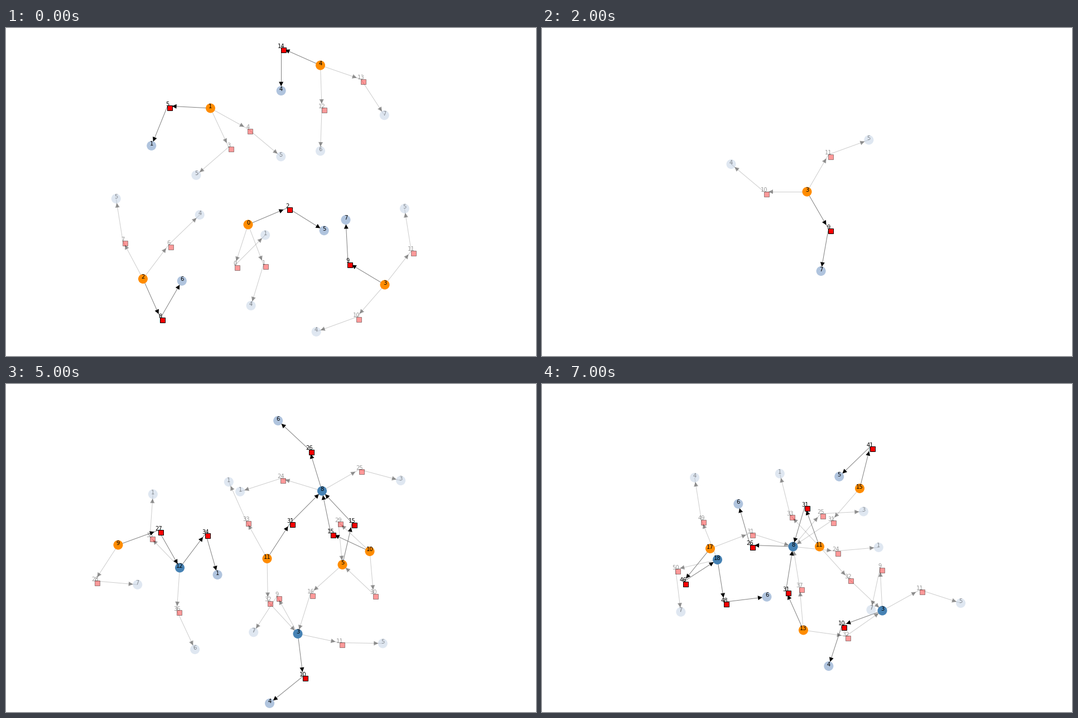
Write a matplotlib script that moves like this. It is 950 px wide and 589 px high and loops after 8 s.

```python
import math

import matplotlib.pyplot as plt
from matplotlib.animation import ArtistAnimation
from matplotlib.patches import Circle, Polygon, Rectangle

W, H, DPI = 950, 589, 100
PX = 72 / DPI  # one pixel in points
LINK, RADIUS, SIDE, HEAD = 77, 8.5, 9, 8
FADED = 0.4
ROOT, INNER, LEAF = "darkorange", "steelblue", "lightsteelblue"

# Where the numbered actions lead: to a loose leaf or on to another state.
LEAVES = {1: (0, 5, 24, 33, 34, 35, 40), 2: (18,), 3: (23, 25, 43),
          4: (1, 6, 10, 14, 45, 49), 5: (2, 3, 4, 7, 11, 19, 41),
          6: (8, 12, 26, 36, 44, 48), 7: (9, 13, 28, 50)}
JOINS = {3: (16, 21, 32), 5: (29, 30), 8: (15, 31, 37),
         12: (27,), 16: (38,), 18: (46,)}

plt.rcParams["font.family"] = "DejaVu Sans"
fig = plt.figure(figsize=(W / DPI, H / DPI), dpi=DPI, facecolor="white")
ax = fig.add_axes([0, 0, 1, 1])
ax.set_xlim(0, W)
ax.set_ylim(H, 0)
ax.axis("off")


def goal(action, groups):
    return next(key for key, members in groups.items() if action in members)


def step(pos, heading):
    """Walk one link from pos; headings are clockwise degrees from the right."""
    angle = math.radians(heading)
    return pos[0] + LINK * math.cos(angle), pos[1] + LINK * math.sin(angle)


def spread(start, turn, *actions):
    """Fan the actions out evenly, each bending on the way to its leaf."""
    bend = 40
    return {a: (start + i * turn, start + i * turn + bend)
            for i, a in enumerate(actions)}


class Net:
    """One picture of the graph: round states joined through square actions."""

    def __init__(self):
        self.places = {}
        self.states = []

    def state(self, key, x, y, actions, color=ROOT):
        """Add a state; its first action is the chosen one, the rest are faded.

        Actions map to (heading, leaf heading), or to one heading for a join.
        """
        self.places[key] = (x, y)
        self.states.append((key, color, actions))

    def artists(self):
        out = []
        for key, color, actions in self.states:
            pos = self.places[key]
            for i, (action, way) in enumerate(actions.items()):
                alpha = FADED if i else 1
                if isinstance(way, tuple):
                    mid = step(pos, way[0])
                    end = step(mid, way[1])
                    out += disc(goal(action, LEAVES), end, LEAF, alpha)
                else:
                    mid = step(pos, way)
                    end = self.places[goal(action, JOINS)]
                out += link(pos, mid, alpha) + link(mid, end, alpha)
                out += square(action, mid, alpha)
            out += disc(key, pos, color)
        return out


def link(a, b, alpha):
    """Thin line from a to b with an arrowhead stopping short of b."""
    dist = math.dist(a, b)
    ux, uy = (b[0] - a[0]) / dist, (b[1] - a[1]) / dist

    def at(back, side):
        return b[0] - ux * back - uy * side, b[1] - uy * back + ux * side

    line, = ax.plot([a[0], b[0]], [a[1], b[1]], color="#808080",
                    lw=PX, alpha=alpha, zorder=1)
    points = [at(HEAD, 0), at(2 * HEAD, HEAD / 2), at(2 * HEAD, -HEAD / 2)]
    head = Polygon(points, fc="black", lw=0, alpha=alpha, zorder=1.5)
    return [line, ax.add_patch(head)]


def caption(label, pos, alpha):
    return ax.text(*pos, str(label), size=10 * PX, ha="center", va="baseline",
                   color="black", alpha=alpha, zorder=3)


def disc(label, pos, color, alpha=1):
    shape = Circle(pos, RADIUS, fc=color, lw=0, alpha=alpha, zorder=2)
    return [ax.add_patch(shape), caption(label, pos, alpha)]


def square(label, pos, alpha):
    shape = Rectangle((pos[0] - 0.5, pos[1] - 0.5), SIDE, SIDE, fc="red",
                      ec="black", lw=PX, alpha=alpha, zorder=2)
    return [ax.add_patch(shape), caption(label, pos, alpha)]


def five_roots(net):
    net.state(0, 434, 353, {2: (-23, 32), 0: (108, -45), 1: (69, 107)})
    net.state(1, 366.5, 144, {5: (183, 112), 3: (65, 139), 4: (29, 40)})
    net.state(2, 245.5, 450.5, {8: (66, -60), 6: (-53, -44), 7: (242, 261)})
    net.state(3, 679, 461, {9: (211, 267), 10: (131, 160), 11: (-52, 261)})
    net.state(4, 563.5, 67, {14: (204, 90), 12: (88, 92), 13: (19, 57)})


def three_roots(net):
    net.state(2, 559.5, 335, {8: (-26, 40), 6: (141, 22), 7: (108, 126)})
    net.state(3, 461, 128, {9: (56, 115), 10: (-9, 31), 11: (173, 83)})
    net.state(4, 311.5, 397, {14: (73, 37), 12: (-28, -33), 13: (254, 267)})


def one_root(net):
    net.state(3, 475, 294, spread(60, 120, 9, 10, 11))


def first_growth(net):
    net.state(3, 465.5, 254, {10: (54, 63), 9: (156, 37), 11: (11, 42)})
    net.state(5, 375, 340.5, {15: 85, 16: -80})
    net.state(6, 662.5, 181.5, {18: (200, 148), 19: (68, 79)})
    net.state(7, 448.5, 100, {23: (186, 29), 21: 84})
    net.state(8, 364, 494, {26: (52, -60), 24: (259, -7), 25: (193, 239)},
              INNER)


def pruned(net):
    net.state(3, 376, 330, spread(80, 100, 10, 9, 11), INNER)
    net.state(5, 495, 262, {15: 8, 16: 170})
    net.state(8, 610, 335, spread(130, -100, 26, 25, 24), INNER)


def second_growth(net):
    net.state(3, 523, 448.5, {10: (83, 141), 9: (241, 123), 11: (12, 1)},
              INNER)
    net.state(5, 603, 324.5, {15: -77, 16: 138})
    net.state(8, 566.5, 192, {26: (253, 223), 24: (197, 162), 25: (-30, 15)},
              INNER)
    net.state(9, 201, 289, {27: -20, 28: (123, 5)})
    net.state(10, 652, 300.5, {15: 205, 29: 223, 30: 85})
    net.state(11, 468, 313.5, {31: -57, 32: 89, 33: (241, 246)})
    net.state(12, 311.5, 330, {34: (-53, 74), 35: (226, -86), 36: (94, 65)},
              INNER)


def widest(net):
    net.state(3, 489.5, 389.5, {10: (107, 116), 9: (153, 157), 11: (18, 4)},
              INNER)
    net.state(5, 404, 275, {16: 77, 15: -8}, INNER)
    net.state(8, 564.5, 270, {26: (264, 236), 24: (231, 178), 25: (34, 38)},
              INNER)
    net.state(10, 419, 264.5, {15: 21, 29: 72, 30: 225})
    net.state(11, 537.5, 428, {31: -83, 32: -71, 33: (63, 100)})
    net.state(13, 549, 247, {31: -17, 32: 111, 37: -35})
    net.state(14, 256.5, 358.5, {40: (86, 137), 38: -89})
    net.state(15, 712, 231, {41: (-86, 27), 31: 155})
    net.state(16, 223.5, 210, {45: (158, 1), 43: (96, 33), 44: (-58, -24)},
              INNER)


def last_growth(net):
    net.state(3, 610, 407, {10: (160, 108), 9: (267, 102), 11: (-29, 18)},
              INNER)
    net.state(8, 450, 292, {26: (182, 254), 24: (6, -5), 25: (-50, -3)},
              INNER)
    net.state(11, 497.5, 292, {31: 250, 32: 48, 33: (227, 256)})
    net.state(13, 468.5, 442, {31: 246, 32: 8, 37: 265})
    net.state(15, 569.5, 187.5, {41: (-76, 136), 31: 131})
    net.state(17, 301.5, 295.5, {46: 129, 31: -21})
    net.state(18, 314.5, 315.5, {48: (81, -7), 49: (248, 261), 50: (167, 83)},
              INNER)


def picture(build):
    net = Net()
    build(net)
    return net.artists()


STAGES = (five_roots, three_roots, one_root, first_growth,
          pruned, second_growth, widest, last_growth)

anim = ArtistAnimation(fig, [picture(build) for build in STAGES],
                       interval=1000, repeat=True, repeat_delay=0)
plt.show()
```
